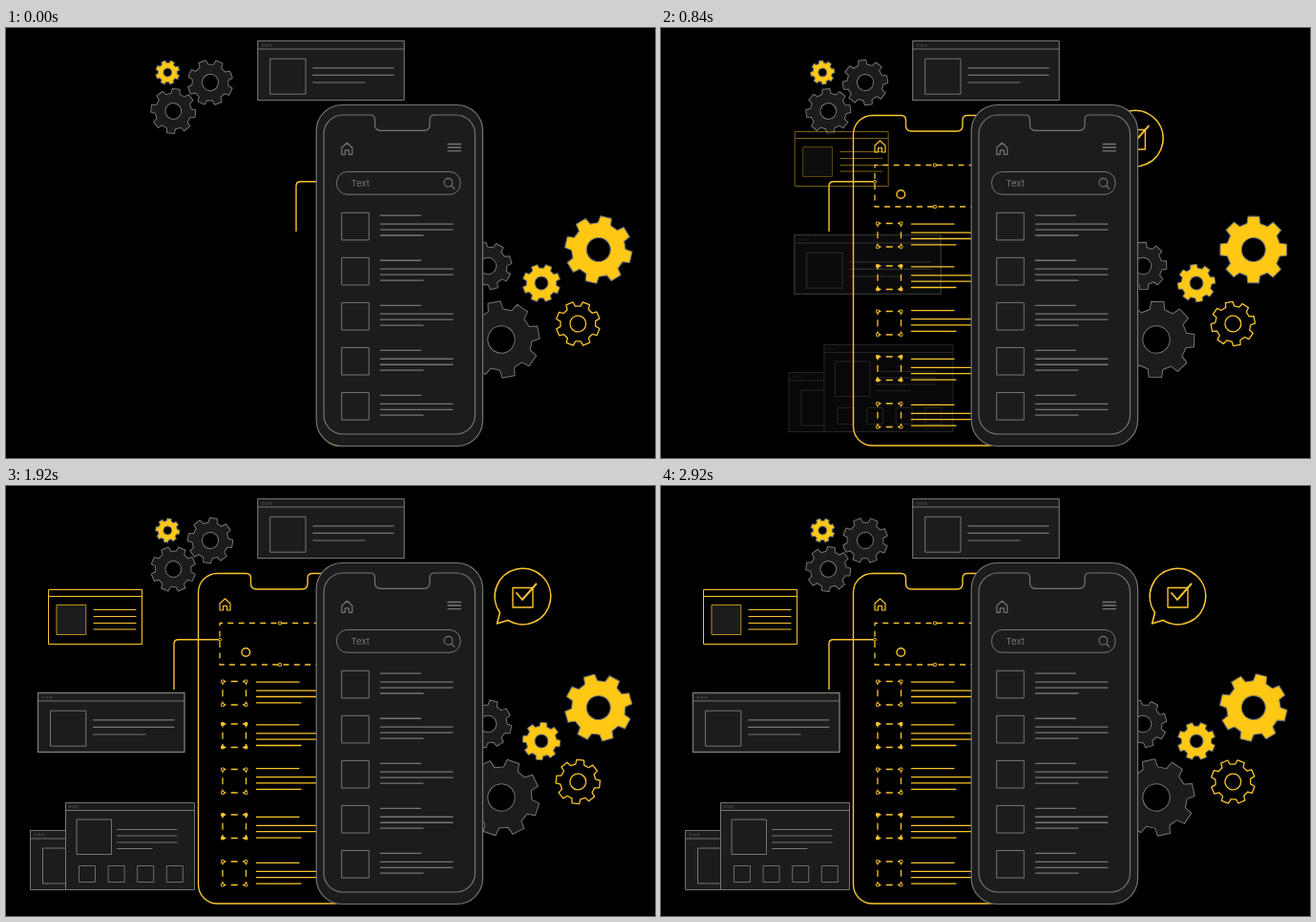
An HTML page that plays this animation: 680 px wide and 450 px high, repeating every 2960 ms.

```html
<!DOCTYPE html>
<html lang="en">
<head>
<meta charset="utf-8">
<title>App design</title>
<style>
  html, body { margin: 0; width: 100%; height: 100%; overflow: hidden; background: #000; }
  svg { display: block; width: 680px; height: 450px; }
  text { font: 9.6px Inter, "Open Sans", sans-serif; fill: #777; stroke: none; }
</style>
</head>
<body>
<svg id="stage" viewBox="0 0 680 450" fill="none" stroke-linejoin="round"></svg>
<script>
const LOOP = 2960, TEETH = 8, PITCH = 360 / TEETH;
const GREY = '#757575', GOLD = '#ffc814', LINE = '#f9c52f', DARK = '#1c1c1c';

const path = (d, stroke = GREY, width = 1.2, extra = '') =>
  `<path d="${d}" stroke="${stroke}" stroke-width="${width}" ${extra}/>`;
const box = (x, y, w, h, stroke = GREY, width = 1, fill = 'none', extra = '') =>
  `<rect x="${x}" y="${y}" width="${w}" height="${h}" stroke="${stroke}" stroke-width="${width}" fill="${fill}" ${extra}/>`;
const ring = (x, y, r, stroke, width = 1, fill = 'none') =>
  `<circle cx="${x}" cy="${y}" r="${r}" stroke="${stroke}" stroke-width="${width}" fill="${fill}"/>`;
const group = (id, content) => `<g id="${id}">${content}</g>`;
const repeat = (n, f) => Array.from({ length: n }, (_, i) => f(i)).join('');

// rows: [y, right end]
const lines = (x, rows, color = GREY, width = 1.3) =>
  rows.map(([y, end]) => path(`M${x} ${y}H${end}`, color, width, 'stroke-linecap="round"')).join('');

// dir: 1 clockwise, -1 counterclockwise
function gear(x, y, R, hole, fill, stroke, width, phase, dir = 1) {
  const points = [];
  for (let i = 0; i < TEETH; i++) {
    for (const [offset, r] of [[-14, .8], [-9.5, 1], [9.5, 1], [14, .8]]) {
      const a = (i * PITCH + offset - 90) * Math.PI / 180;
      points.push((R * r * Math.cos(a)).toFixed(2) + ' ' + (R * r * Math.sin(a)).toFixed(2));
    }
  }
  return `<g transform="translate(${x} ${y})"><g class="gear" data-phase="${phase}" data-dir="${dir}">` +
    path(`M${points.join('L')}Z`, stroke, width, `fill="${fill}"`) +
    ring(0, 0, hole, stroke, width, fill === 'none' ? 'none' : '#000') + '</g></g>';
}

const house = (x, y, color) =>
  path(`M${x - 5.5} ${y - 1}L${x} ${y - 6}L${x + 5.5} ${y - 1}V${y + 6}H${x + 2}V${y + 1.5}H${x - 2}V${y + 6}H${x - 5.5}Z`, color, 1.2);

const dots = (x, y, gap) => repeat(3, i => ring(x + i * gap, y, 1.2, '#4c4c4c', .7));

const notched = (x, y, right, bottom, r, from, to, depth) =>
  `M${x + r} ${y}H${from - 5}Q${from} ${y} ${from} ${y + 5}V${y + depth - 6}` +
  `Q${from} ${y + depth} ${from + 6} ${y + depth}H${to - 6}Q${to} ${y + depth} ${to} ${y + depth - 6}` +
  `V${y + 5}Q${to} ${y} ${to + 5} ${y}H${right - r}a${r} ${r} 0 0 1 ${r} ${r}V${bottom - r}` +
  `a${r} ${r} 0 0 1 ${-r} ${r}H${x + r}a${r} ${r} 0 0 1 ${-r} ${-r}V${y + r}a${r} ${r} 0 0 1 ${r} ${-r}Z`;

const wideCard = (x, y, width) =>
  box(x, y, 153.5, 62, GREY, width, DARK) + path(`M${x} ${y + 8.5}h153.5`, GREY, 1) +
  dots(x + 5.5, y + 4.7, 4) + box(x + 13, y + 18.7, 37.3, 37) +
  lines(x + 58, [[y + 28.3, x + 142.5], [y + 35.8, x + 142.5], [y + 43.5, x + 112.5]], GREY, 1.2);

const goldCard =
  box(44.5, 108.5, 98, 57, LINE, 1, '#000') + path('M44.5 115.5h98', LINE, 1) +
  box(53, 124.5, 30.8, 31, '#b8921a', 1, DARK) +
  lines(92, [129.5, 136.5, 143.5, 150].map(y => [y, 136]), LINE, 1.2);

const stackedCards =
  box(25.5, 360.5, 80, 62, GREY, 1, DARK) + path('M25.5 369h80', GREY, 1) +
  dots(31, 365, 4) + box(38.5, 379, 37, 37) +
  box(62.5, 331.5, 135, 91, GREY, 1, DARK) + path('M62.5 339.5h135', GREY, 1) +
  dots(67, 335.6, 3.6) + box(74, 349, 36.5, 36.5) +
  lines(116.5, [[359.5, 179], [366, 179], [373, 179], [379.5, 153]], GREY, 1) +
  repeat(4, i => box(76.5 + i * 30.6, 397.5, 17, 17, GREY, .9));

const bubble =
  path('M517.5 132.5A29.3 29.3 0 1 1 526 140.5L514.5 144Z', LINE, 1.6) +
  box(531, 106.5, 21, 20.5, LINE, 1.4) + path('M534.5 111.5L541 119L556 102', LINE, 1.9);

const handle = (x, y, fill = '#000') => box(x - 1.4, y - 1.4, 2.8, 2.8, LINE, .9, fill);

// top: frame's upper edge, first: y of the first text line
function wireItem([top, first], i) {
  const fill = i % 2 ? LINE : '#000';
  const corners = [227, 251.5].map(x => handle(x, top, fill) + handle(x, top + 24.5, fill)).join('');
  return box(227, top, 24.5, 24.5, LINE, 1.3, 'none', 'stroke-dasharray="7 5.25" stroke-dashoffset="3.5"') +
    corners +
    lines(262.5, [[first, 307], [first + 9, 338], [first + 15.3, 338], [first + 21.7, 309]], LINE);
}
const wireItems = [[204.5, 205.2], [249, 249.8], [296.5, 295.6], [344, 346.4], [393, 394.4]];

const wirePhone =
  path(notched(201.5, 91.5, 362, 437, 20, 256.5, 316, 16.5), LINE, 1.4) +
  house(229.5, 124, LINE) +
  box(224, 143.5, 126, 43.5, LINE, 1.3, 'none', 'stroke-dasharray="6 5.3" stroke-dashoffset="3"') +
  handle(287, 143.5) + handle(287, 187) + ring(251.3, 174, 4.3, LINE, 1.4) +
  path('M176 213V165.5Q176 160.8 180.7 160.8H223', LINE, 1.4) +
  ring(224, 160.8, 1.5, LINE, 1, '#000') + wireItems.map(wireItem).join('');

function listItem(i) {
  const y = 193.3 + i * 47.05;
  return box(351.7, y, 28.6, 28.6) +
    lines(392.5, [[y + 2.9, 434.5], [y + 11.8, 468], [y + 17.8, 468], [y + 23.7, 437]]);
}

const phone =
  box(325.2, 80.5, 174.3, 357, GREY, 1.2, DARK, 'rx="27"') +
  path(notched(333, 91, 491.5, 425, 20, 386.5, 444, 16.3), GREY, 1.2) +
  house(357.3, 126.3, GREY) +
  lines(463, [[121.5, 476.5], [125, 476.5], [128.6, 476.5]]) +
  box(346.5, 150.5, 129.5, 23.7, GREY, 1, 'none', 'rx="11"') +
  '<text x="361.5" y="166">Text</text>' +
  ring(463.4, 161.8, 4.4, GREY, 1.1) + path('M466.6 165L470.2 168.7') +
  repeat(5, listItem);

const $ = id => document.getElementById(id);
$('stage').innerHTML =
  gear(214, 57, 23.8, 8.6, DARK, GREY, 1, -21) +
  gear(175.3, 87, 23.6, 8.4, DARK, GREY, 1, 7, -1) +
  gear(169.3, 46.5, 12.6, 4.4, GOLD, GREY, 1, -21) +
  wideCard(263.7, 13.5, 1.1) +
  gear(505, 249, 25, 8.8, DARK, GREY, 1, -15) +
  gear(519, 326, 40.2, 14.2, DARK, GREY, 1, -11) +
  gear(561, 267, 19.8, 7, GOLD, GREY, 1, -22) +
  gear(620.8, 232, 35.3, 12.5, GOLD, GREY, 1.1, 13, -1) +
  gear(599.3, 309.5, 23.2, 8.4, 'none', LINE, 1.3, -23) +
  group('stack', stackedCards) + group('wide', wideCard(33.5, 216.5, 1.4)) +
  group('gold', goldCard) + group('wire', wirePhone) + group('bubble', bubble) + phone;

// id, start, duration, initial x offset, fades in
const slides = [
  ['wire', 0, 523, 128, false],
  ['bubble', 560, 640, -75, false],
  ['gold', 600, 645, 138, true],
  ['wide', 640, 640, 137, true],
  ['stack', 685, 640, 126, true]
].map(([id, ...rest]) => [$(id), ...rest]);
const gears = [...document.querySelectorAll('.gear')];

function draw() {
  const t = performance.now() % LOOP;
  for (const [el, start, duration, dx, fades] of slides) {
    const u = Math.min(1, Math.max(0, (t - start) / duration));
    const left = (1 + Math.cos(Math.PI * u)) / 2;
    el.setAttribute('transform', `translate(${dx * left} 0)`);
    if (fades) el.setAttribute('opacity', Math.min(1, u * 1.3));
  }
  // each gear advances by one tooth per loop, so the loop is seamless
  for (const { dataset: { phase, dir }, ...rest } of gears.map(el => ({ el, dataset: el.dataset })))
    rest.el.setAttribute('transform', `rotate(${+phase + dir * PITCH * t / LOOP})`);
  requestAnimationFrame(draw);
}
draw();
</script>
</body>
</html>
```
